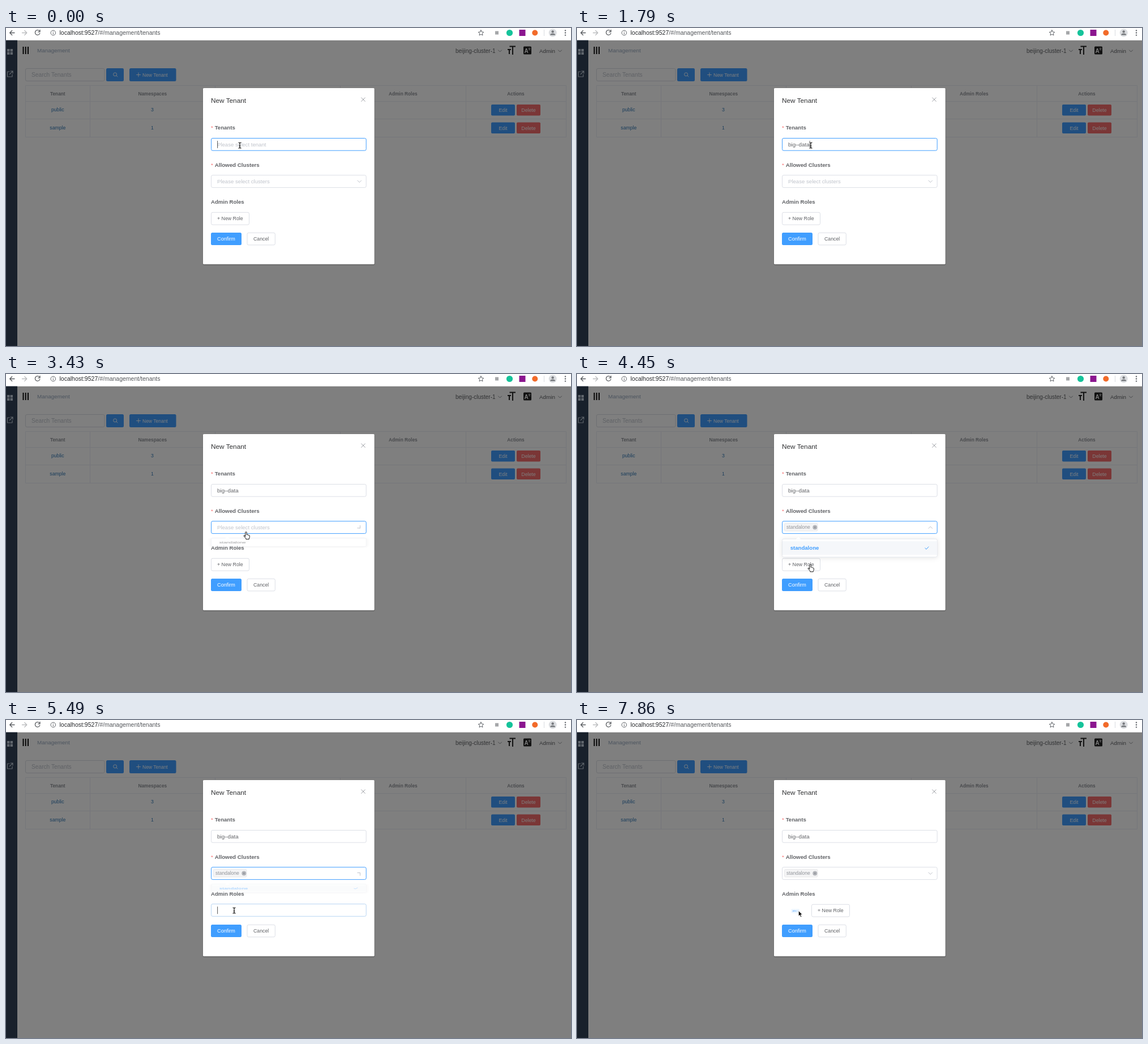
Recreate the animation shown at these times as an HTML page. Size 998 by 561 pixels, loop 8 s.

```html
<!DOCTYPE html>
<html lang="en">
<head>
<meta charset="utf-8">
<title>New Tenant</title>
<style>
html, body { margin: 0; width: 100%; height: 100%; overflow: hidden; background: #fff; }
svg { display: block; width: 998px; height: 561px; font: 9.6px "Liberation Sans", Arial, sans-serif; }
text { fill: #606266; white-space: pre; }
.mid { text-anchor: middle; }
.bold { font-weight: bold; }
.head { font-size: 8.3px; font-weight: bold; fill: #909399; text-anchor: middle; }
.cell { font-size: 8.7px; fill: #337ab7; text-anchor: middle; }
.small { font-size: 8.8px; }
.hint { fill: #c0c4cc; }
.white { fill: #fff; }
.line { fill: none; stroke: #909399; stroke-linecap: round; stroke-linejoin: round; }
.box { fill: #fff; stroke: #dcdfe6; }
</style>
</head>
<body>
<svg viewBox="0 0 998 561">
  <!-- page under the shade -->
  <rect y="21" width="998" height="540" fill="#fff"/>
  <rect y="21" width="20" height="540" fill="#304156"/>
  <path d="M2 37h4.4v4.4H2zM7.6 37H12v4.4H7.6zM2 42.6h4.4V47H2zM7.6 42.6H12V47H7.6z" fill="#bfcbd9"/>
  <path class="line" style="stroke:#bfcbd9" stroke-width="1.2" d="M6 77H2.5V86H11V82M8 76h4v4M12 76L6.5 81.5"/>
  <path d="M30.5 33v13M34.7 33v13M39 33v13" stroke="#000" stroke-width="1.9"/>
  <text x="55" y="43" font-size="9.9" style="fill:#97a8be">Management</text>
  <text x="794" y="43.5" font-size="10">beijing-cluster-1</text>
  <path class="line" d="M869.5 39l3 3 3-3M975.5 39l3 3 3-3"/>
  <path d="M889.5 32.5H900M895 32.5V47M886 38h6M889 38v8" fill="none" stroke="#222" stroke-width="2"/>
  <rect x="914" y="32.5" width="14" height="14" rx="1.5" fill="#222"/>
  <text x="915.5" y="44" font-size="10" class="white bold">A</text>
  <path d="M922.5 36h4M924.5 35v1M923 39.5l3-3M923.2 37l3 2.5" stroke="#fff" stroke-width=".7"/>
  <text x="942" y="43.5" font-size="9.9">Admin</text>
  <rect class="box" x="34.5" y="71.5" width="139.5" height="22" rx="2.5"/>
  <text x="45" y="86" font-size="10.2" class="hint">Search Tenants</text>
  <g fill="#409eff">
    <rect x="177" y="71" width="31" height="23" rx="2.5"/>
    <rect x="218" y="71" width="82.5" height="23" rx="2.5"/>
  </g>
  <path class="line" style="stroke:#fff" stroke-width=".9" d="M195 84l2 2M230.5 82.5h7M234 79v7"/>
  <circle cx="192.6" cy="81.8" r="3" fill="none" stroke="#fff" stroke-width=".9"/>
  <text x="241" y="85.6" font-size="8.5" class="white">New Tenant</text>
  <path fill="none" stroke="#ebeef5" d="M34.5 101.5h955v91H34.5zM34 129.5h956M34 160.5h956M148.5 101v92M369.5 101v92M590.5 101v92M812.5 101v92"/>
  <text class="head" x="91.3" y="118.5">Tenant</text>
  <text class="head" x="258.8" y="118.5">Namespaces</text>
  <text class="head" x="701.3" y="118.5">Admin Roles</text>
  <text class="head" x="900.5" y="118.5">Actions</text>
  <g id="rows"></g>
  <rect y="21.5" width="998" height="539.5" fill="#000" opacity=".5"/>

  <!-- browser bar -->
  <rect width="998" height="21.5" fill="#fff"/>
  <path class="line" style="stroke:#5a5d61" stroke-width="1.3" d="M15 8.5H7M10.7 4.5l-4 4 4 4M59 5.2A4.3 4.3 0 1 0 59.8 9.4M60 3.5v3.3h-3.3"/>
  <path class="line" style="stroke:#babcbe" stroke-width="1.3" d="M28.5 8.5h8M32.8 4.5l4 4-4 4"/>
  <circle cx="83.3" cy="8.5" r="4.3" fill="none" stroke="#5f6368"/>
  <path d="M83.3 8v3M83.3 5.8v1.2" stroke="#5f6368"/>
  <text x="94.5" y="12.2" font-size="10.5" style="fill:#27292c">localhost:9527<tspan fill="#55585c">/#/management/tenants</tspan></text>
  <path class="line" style="stroke:#5f6368" d="M839 3.8l1.4 3.1 3.4.4-2.5 2.3.7 3.3-3-1.7-3 1.7.7-3.3-2.5-2.3 3.4-.4z"/>
  <rect x="864" y="5.5" width="6" height="6" fill="#a5a7a9"/>
  <circle cx="889.5" cy="8.5" r="5.6" fill="#15c39a"/>
  <rect x="906.5" y="3" width="11" height="11" fill="#8b168f"/>
  <circle cx="934.3" cy="8.5" r="5" fill="#f26b2a"/>
  <path d="M950.5 3v11" stroke="#dadce0"/>
  <circle cx="965.7" cy="8.5" r="7" fill="#dcdee1"/>
  <path d="M961.2 12.6q0-3 4.5-3t4.5 3z" fill="#777a7e"/>
  <circle cx="965.7" cy="6.4" r="2.2" fill="#777a7e"/>
  <g fill="#5f6368"><circle cx="988" cy="4.4" r="1.2"/><circle cx="988" cy="8.5" r="1.2"/><circle cx="988" cy="12.6" r="1.2"/></g>

  <!-- dialog -->
  <rect x="347.5" y="106.5" width="304" height="312" rx="2" fill="#000" opacity=".18"/>
  <rect x="348" y="106" width="302.7" height="310.7" rx="1.5" fill="#fff"/>
  <text x="362" y="132.4" font-size="11.8" style="fill:#303133">New Tenant</text>
  <path class="line" stroke-width=".9" d="M627.7 122.9l6.6 6.6M634.3 122.9l-6.6 6.6"/>
  <text x="362" y="179.3" style="fill:#f56c6c">*</text>
  <text x="368.7" y="179.3" class="bold">Tenants</text>
  <text x="362" y="244.5" style="fill:#f56c6c">*</text>
  <text x="368.7" y="244.5" font-size="9.75" class="bold">Allowed Clusters</text>
  <text x="362" y="309.7" class="bold">Admin Roles</text>
  <rect id="nameBox" class="box" x="362.5" y="194.5" width="273.7" height="21.7" rx="2.5"/>
  <text id="nameHint" class="hint" x="373" y="209">Please select tenant</text>
  <text id="name" x="373" y="209" font-size="9.8"></text>
  <rect id="selBox" class="box" x="362.5" y="259.7" width="273.7" height="21.7" rx="2.5"/>
  <text id="selHint" class="hint" x="373" y="274.1">Please select clusters</text>
  <g id="tag">
    <rect x="366.5" y="263.5" width="58.5" height="13.5" rx="2" fill="#f4f4f5" stroke="#e9e9eb"/>
    <text x="370" y="273.4" font-size="8.55" style="fill:#909399">standalone</text>
    <circle cx="420.3" cy="270.5" r="4" fill="#b4b6bb"/>
    <path d="M418.9 269.1l2.8 2.8M421.7 269.1l-2.8 2.8" stroke="#777a80" stroke-width=".8"/>
  </g>
  <path id="arrow" class="line" style="stroke:#c0c4cc" d="M-3.3 1.7L0-1.7 3.3 1.7"/>
  <g id="newRole">
    <rect id="newBox" class="box" x=".5" y="325.3" width="67" height="21.8" rx="2.5"/>
    <text id="newText" class="small" x="11" y="339.2">+ New Role</text>
  </g>
  <g id="roleInput">
    <rect id="roleBox" class="box" x="362.5" y="324.6" width="273.7" height="21.7" rx="2.5"/>
    <text id="role" x="373" y="339.2"></text>
  </g>
  <g id="roleTag">
    <rect x="-22" y="-11" width="44" height="22" rx="2.5" fill="#ecf5ff" stroke="#d9ecff"/>
    <text x="-16" y="3" font-size="8.5" style="fill:#409eff">admin</text>
    <path d="M12-2l4 4M16-2l-4 4" stroke="#409eff"/>
  </g>
  <rect x="362" y="361" width="54" height="22" rx="2.5" fill="#409eff"/>
  <text x="389" y="375" font-size="9.1" class="mid white">Confirm</text>
  <rect class="box" x="426" y="361.3" width="49.3" height="21.5" rx="2.5"/>
  <text x="450.6" y="375" class="mid small">Cancel</text>
  <g id="drop">
    <rect x="362.5" y="291" width="273.7" height="32" rx="2.5" fill="#fff" stroke="#e4e7ed" style="filter:drop-shadow(0 1.4px 4px rgba(0,0,0,.1))"/>
    <path d="M386.5 291.6l4.5-4 4.5 4z" fill="#fff"/>
    <rect id="row" x="363" y="295" width="272.7" height="24" fill="#f5f7fa"/>
    <text id="option" x="376.7" y="310.4">standalone</text>
    <path id="check" class="line" style="stroke:#409eff" d="M614.8 307l2.2 2.2 4-4.4"/>
  </g>
  <rect id="caret" width=".9" height="13" fill="#444"/>
  <g id="beam">
    <path d="M-2.5-5Q0-5 0-3.5Q0-5 2.5-5M0-4V4M-2.5 5Q0 5 0 3.5Q0 5 2.5 5M-1.2 1H1.2" fill="none" stroke="#fff" stroke-width="2.4" opacity=".8"/>
    <path d="M-2.5-5Q0-5 0-3.5Q0-5 2.5-5M0-4V4M-2.5 5Q0 5 0 3.5Q0 5 2.5 5M-1.2 1H1.2" fill="none" stroke="#000" stroke-width="1.1"/>
  </g>
  <path id="hand" fill="#fff" stroke="#000" stroke-width=".9" stroke-linejoin="round" d="M-1.2 8V.8Q-1.2-.5 0-.5T1.2.8V4.5Q2.6 3.7 3 5Q4.4 4.4 4.8 5.7Q6.3 5.2 6.3 6.8V8.6Q6.3 10 5.3 11V12.4H-.2V11.2L-3.8 7Q-4.3 5.7-3 5.7Q-2 5.9-1.2 7.4"/>
  <path id="pointer" fill="#000" stroke="#fff" stroke-width=".8" d="M0 0V9.6L2.2 7.6 3.8 11.2 5.5 10.4 3.9 7H6.8z"/>
</svg>
<script>
const $ = id => document.getElementById(id);
const BLUE = '#409eff', GREY = '#dcdfe6', HOVER = '#c0c4cc', MID = '#8ebfF2', PALE = '#b9d6f3';

$('rows').innerHTML = [['public', 3, 135], ['sample', 1, 166.5]].map(([tenant, count, y]) => {
  const button = (x, fill, label) => `<rect x="${x}" y="${y}" width="42" height="19.5" rx="2" fill="${fill}"/>
    <text x="${x + 21}" y="${y + 13}" class="mid white small">${label}</text>`;
  return `<text class="cell" x="91.3" y="${y + 12.4}">${tenant}</text><text class="cell" x="258.5" y="${y + 12.4}">${count}</text>`
    + button(857, BLUE, 'Edit') + button(902, '#f56c6c', 'Delete');
}).join('');

// Each step holds only what changes at its time.
const steps = [
  [0, { name: '', role: '', nameBox: BLUE, selBox: GREY, roleBox: GREY, caret: 'name', cursor: 'beam', at: [413, 207],
        drop: 0, fade: 1, turn: 180, over: false, picked: false, hot: false, editing: false, newX: 362, roleTag: 0 }],
  [300, { name: 'b' }], [450, { name: 'bi' }], [900, { name: 'big' }],
  [1340, { name: 'big–' }], [1490, { name: 'big–d' }], [1640, { name: 'big–da' }], [1790, { name: 'big–data' }],
  [2240, { at: [416, 224] }],
  [2390, { cursor: 'hand', at: [423, 268], selBox: HOVER }],
  [2840, { caret: '', nameBox: MID, selBox: MID, at: [424, 275] }],
  [2990, { nameBox: GREY, selBox: BLUE, at: [424, 279] }],
  [3430, { drop: .46, fade: .6, turn: 135 }],
  [3580, { drop: .9, fade: .92, turn: 25 }],
  [3730, { drop: 1, fade: 1, turn: 0 }],
  [3870, { at: [419, 298], over: true }],
  [4020, { at: [414, 308] }],
  [4310, { picked: true }],
  [4450, { at: [412, 336.5] }],
  [4600, { at: [411, 339], hot: true }],
  [4750, { at: [409, 340] }], [4900, { at: [407, 339] }], [5040, { at: [405, 338] }],
  [5190, { at: [404, 337] }], [5340, { at: [403, 336] }],
  [5490, { editing: true, hot: false, caret: 'role', cursor: 'beam', roleBox: PALE, drop: .46, fade: .4, turn: 45 }],
  [5640, { roleBox: MID, selBox: MID, drop: .1, fade: .1, turn: 150, at: [402, 336] }],
  [5790, { roleBox: BLUE, selBox: GREY, drop: 0, turn: 180, at: [399, 336] }],
  [5930, { at: [395, 337] }], [6080, { at: [392, 337] }],
  [6530, { role: 'a' }], [6970, { role: 'ad' }], [7120, { role: 'adm' }], [7270, { role: 'admin' }],
  [7710, { editing: false, caret: '', newX: 414, roleTag: .06 }],
  [7860, { cursor: 'pointer', at: [391.3, 336.5], roleTag: .3 }]
];

const show = (id, on) => $(id).style.display = on ? '' : 'none';
const move = (id, value) => $(id).setAttribute('transform', value);

function draw() {
  const now = performance.now() % 8000;
  const s = Object.assign({}, ...steps.filter(([time]) => time <= now).map(([, change]) => change));

  for (const id of ['nameBox', 'selBox', 'roleBox']) $(id).style.stroke = s[id];
  $('name').textContent = s.name;
  $('role').textContent = s.role;
  show('nameHint', !s.name);
  show('selHint', !s.picked);
  show('tag', s.picked);
  move('arrow', `translate(624.3 270.7) rotate(${s.turn})`);

  show('drop', s.drop);
  move('drop', `translate(0 ${288.5 * (1 - s.drop)}) scale(1 ${s.drop})`);
  $('drop').style.opacity = s.fade;
  show('row', s.over);
  show('check', s.picked);
  $('option').style.fill = s.picked ? BLUE : '#606266';
  $('option').style.fontWeight = s.picked ? 'bold' : 'normal';

  show('roleInput', s.editing);
  show('newRole', !s.editing);
  move('newRole', `translate(${s.newX} 0)`);
  $('newBox').style.fill = s.hot ? '#ecf5ff' : '#fff';
  $('newBox').style.stroke = s.hot ? '#c6e2ff' : GREY;
  $('newText').style.fill = s.hot ? BLUE : '#606266';
  show('roleTag', s.roleTag);
  move('roleTag', `translate(385.5 337) scale(${s.roleTag})`);

  show('caret', s.caret);
  if (s.caret) {
    const field = $(s.caret);
    $('caret').setAttribute('x', 373.2 + (field.textContent ? field.getComputedTextLength() : 0));
    $('caret').setAttribute('y', field.getAttribute('y') - 10);
  }
  for (const id of ['beam', 'hand', 'pointer']) show(id, id === s.cursor);
  move(s.cursor, `translate(${s.at})`);
  requestAnimationFrame(draw);
}
draw();
</script>
</body>
</html>
```
